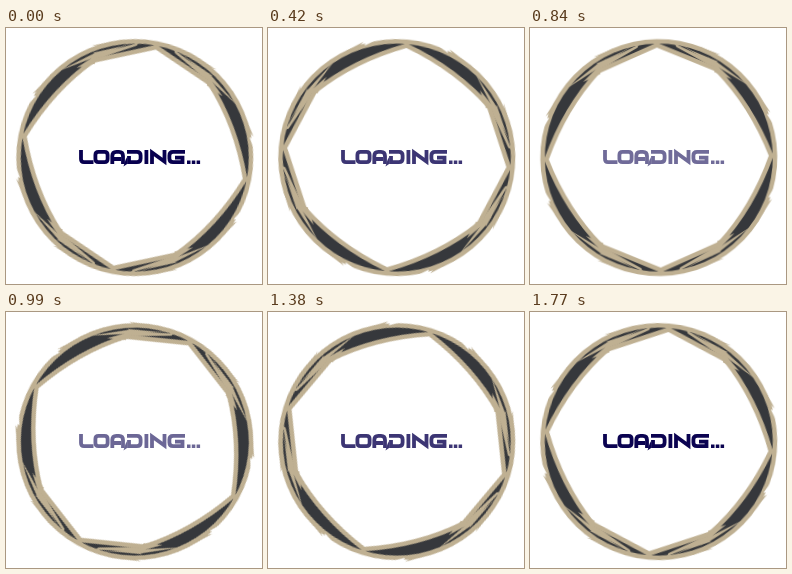
Animation, 256 px wide and 256 px high, one loop 1.8 s. Source, as an HTML page:

```html
<!DOCTYPE html>
<html lang="en">
<head>
<meta charset="utf-8">
<title>Loading</title>
<style>
  html, body { margin: 0; width: 100%; height: 100%; overflow: hidden; background: #fff; }
  svg { display: block; width: 100vw; height: 100vh; }
  #ring { animation: spin 1.8s steps(60) infinite; }
  #word { animation: fade 1.8s infinite; }
  .tan { fill: #bfb092; }
  .dark { fill: #36383c; }
  .hole { fill: #fff; stroke: #bfb092; stroke-width: 9; paint-order: stroke; }
  .letters { fill: none; stroke: #08004f; stroke-width: 3.8; }
  .solid { fill: #08004f; }
  @keyframes spin { from { transform: rotate(11deg); } to { transform: rotate(371deg); } }
  @keyframes fade {
    0% { opacity: 1; animation-timing-function: steps(30); }
    50% { opacity: .55; animation-timing-function: steps(30); }
    100% { opacity: 1; }
  }
</style>
</head>
<body>
<svg viewBox="0 0 256 256" role="img" aria-label="LOADING...">
  <g transform="translate(128.8 129.6)">
    <g id="ring">
      <circle class="tan" r="118.5"/>
      <circle class="dark" r="114"/>
      <path class="hole" d="M110 0 Q91 50.3 57.6 85.4 L0 110 L-57.6 85.4 Q-91 50.3 -110 0
        Q-91 -50.3 -57.6 -85.4 L0 -110 L57.6 -85.4 Q91 -50.3 110 0 Z"/>
      <g id="bolts"></g>
    </g>
  </g>
  <g id="word">
    <g class="letters">
      <path d="M75 122 V131 Q75 134.1 78 134.1 H87.5"/>
      <path d="M92.5 123.9 H98.5 Q101.6 123.9 101.6 127 V131 Q101.6 134.1 98.5 134.1 H92.5 Q89.4 134.1 89.4 131 V127 Q89.4 123.9 92.5 123.9 Z"/>
      <path d="M106.3 136 V128 Q106.3 123.9 110.3 123.9 H113 Q117 123.9 117 128 V136 M106 131 H115"/>
      <path d="M121 123.9 H131 Q134.6 123.9 134.6 127.5 V130.5 Q134.6 134.1 131 134.1 H123 V128"/>
      <path d="M140.4 122 V136"/>
      <path d="M146 136 V124.5 L158.5 133.5 V122"/>
      <path d="M179 123.9 H167 Q163.4 123.9 163.4 127.5 V130.5 Q163.4 134.1 167 134.1 H176.5 V129.6 H169"/>
    </g>
    <path class="solid" d="M121.1 129 V136 L117.5 138.5 L119.5 132 Z"/>
    <path class="solid" d="M181 132.5 h3.5 v3.5 h-3.5 z m4.8 0 h3.5 v3.5 h-3.5 z m4.8 0 h3.5 v3.5 h-3.5 z"/>
  </g>
</svg>
<script>
  // Each shape is a list of radius, angle pairs within one quarter of the ring.
  const shapes = [
    ['#bfb092', [[115, 81], [110, 62], [112, 63], [107, 46], [102, 56], [106.5, 58], [105.5, 62], [112, 80]]],
    ['#bfb092', [[115, 38], [112, 58], [113, 57], [112, 72], [115, 78]]],
    ['#fff', [[120, 14], [116.5, 21], [120, 20]]],
    ['#bfb092', [[117, 24], [120.5, 21], [118, 31]]],
    ['#bfb092', [[117, 62], [120, 58], [118, 68]]]
  ];
  const point = ([r, deg]) => {
    const a = deg * Math.PI / 180;
    return `${r * Math.cos(a)},${r * Math.sin(a)}`;
  };
  const quarter = shapes.map(([fill, pts]) =>
    `<polygon fill="${fill}" points="${pts.map(point).join(' ')}"/>`).join('');

  // The four quarters mirror each other across both axes.
  document.getElementById('bolts').innerHTML = ['1 1', '-1 1', '-1 -1', '1 -1'].map(flip =>
    `<g transform="scale(${flip})">${quarter}</g>`).join('');
</script>
</body>
</html>
```
